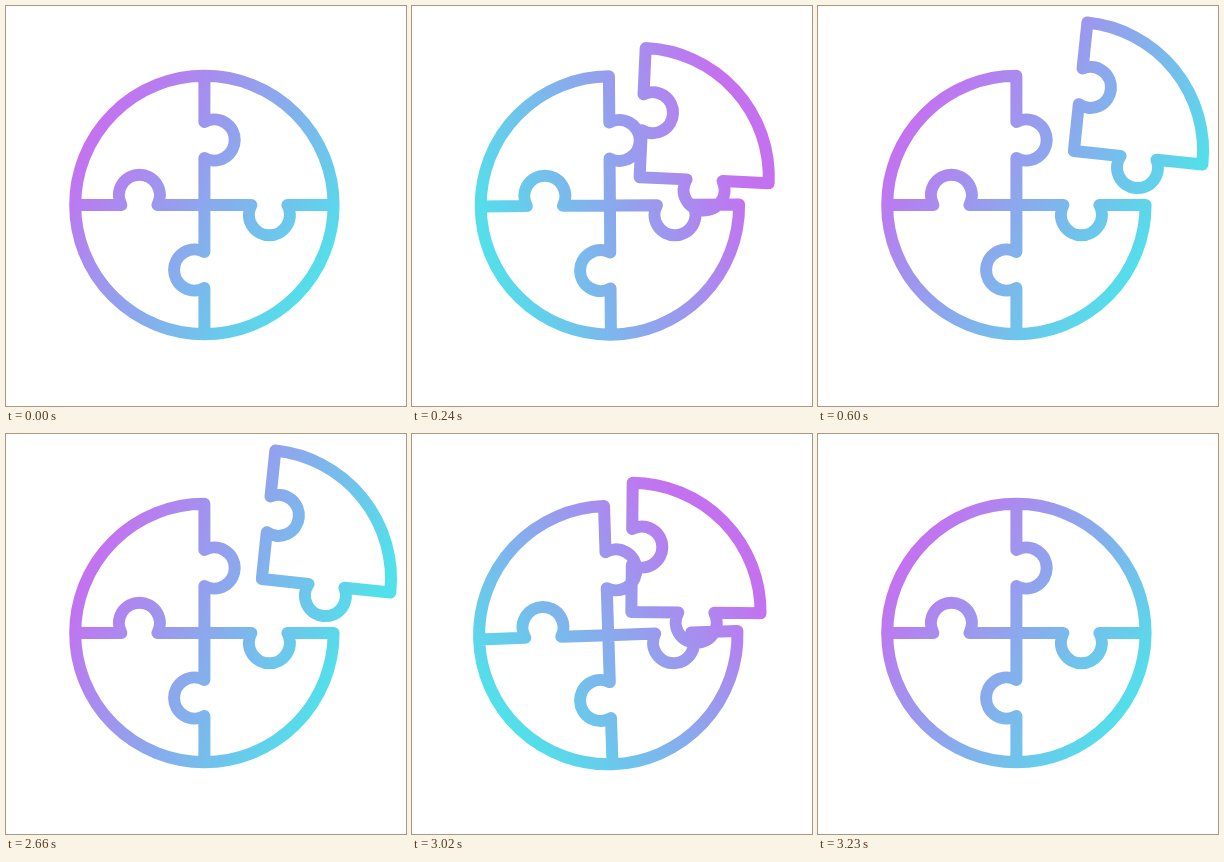
Recreate the animation shown at these times as an HTML page with a canvas. Size 400 by 400 pixels, loop 4260 ms.

```html
<!DOCTYPE html>
<html lang="en">
<head>
<meta charset="utf-8">
<title>Puzzle circle</title>
<style>
  html, body { margin: 0; width: 100%; height: 100%; overflow: hidden; background: #fff; }
  canvas { display: block; width: 100vmin; height: 100vmin; }
</style>
</head>
<body>
<canvas id="stage" width="400" height="400"></canvas>
<script>
const ctx = document.getElementById('stage').getContext('2d');

const LOOP = 4260, STEP = 30, STEPS = 20, CLOSE_START = 2630;
const CENTER = { x: 198.4, y: 199 };
const RADIUS = 129.2;
const PURPLE = '#c471f0', CYAN = '#52e0ea';

const clamp = v => Math.min(1, Math.max(0, v));
const smooth = v => (v = clamp(v), v * v * (3 - 2 * v));

// A spoke runs from the hub outwards with one round tab on its clockwise side.
const spoke = new Path2D(`M0 0V-47A20.5 20.5 0 1 0 0 -83V${-RADIUS}`);

function makeShape(arcFlags, spokeCount) {
  const shape = new Path2D(`M0 ${-RADIUS}A${RADIUS} ${RADIUS} 0 ${arcFlags} ${RADIUS} 0`);
  for (let i = 0; i < spokeCount; i++) {
    shape.addPath(spoke, new DOMMatrix().rotate(90 * i));
  }
  return shape;
}
const body = makeShape('1 0', 4);
const piece = makeShape('0 1', 2);

// Steps into the closing move; opening is the same move backwards.
function closingStep(time) {
  const step = time < CLOSE_START
    ? STEPS - Math.floor(time / STEP)
    : Math.floor((time - CLOSE_START) / STEP);
  return Math.min(STEPS, Math.max(0, step));
}

function makeGradient(step) {
  const u = step / STEPS;
  const turn = 0.3 * u + 0.7 * smooth(u);
  const angle = (213 - 360 * turn) * Math.PI / 180;
  const dx = 136 * Math.cos(angle), dy = 136 * Math.sin(angle);
  const gradient = ctx.createLinearGradient(200 + dx, 200 + dy, 200 - dx, 200 - dy);
  gradient.addColorStop(0, PURPLE);
  gradient.addColorStop(1, CYAN);
  return gradient;
}

function draw(time) {
  const step = closingStep(time);
  const open = 1 - clamp(step / 16.1) ** 2.5;
  const recoil = step < 16.7
    ? smooth((step - 11.2) / 5.5)
    : 1 - smooth((step - 16.7) / 3.3);

  const bodyPose = new DOMMatrix()
    .translate(CENTER.x - 8.5 * recoil, CENTER.y + 8.5 * recoil)
    .rotate(-7.5 * recoil);
  const piecePose = bodyPose.translate(57.5 * open, -54 * open).rotate(6 * open);

  // Posed paths keep the gradient fixed to the stage.
  const picture = new Path2D();
  picture.addPath(body, bodyPose);
  picture.addPath(piece, piecePose);

  ctx.fillStyle = '#fff';
  ctx.fillRect(0, 0, 400, 400);
  ctx.lineWidth = 12;
  ctx.lineCap = ctx.lineJoin = 'round';
  ctx.strokeStyle = makeGradient(step);
  ctx.stroke(picture);
}

const start = performance.now();
function tick() {
  draw((performance.now() - start) % LOOP);
  requestAnimationFrame(tick);
}
tick();
</script>
</body>
</html>
```
